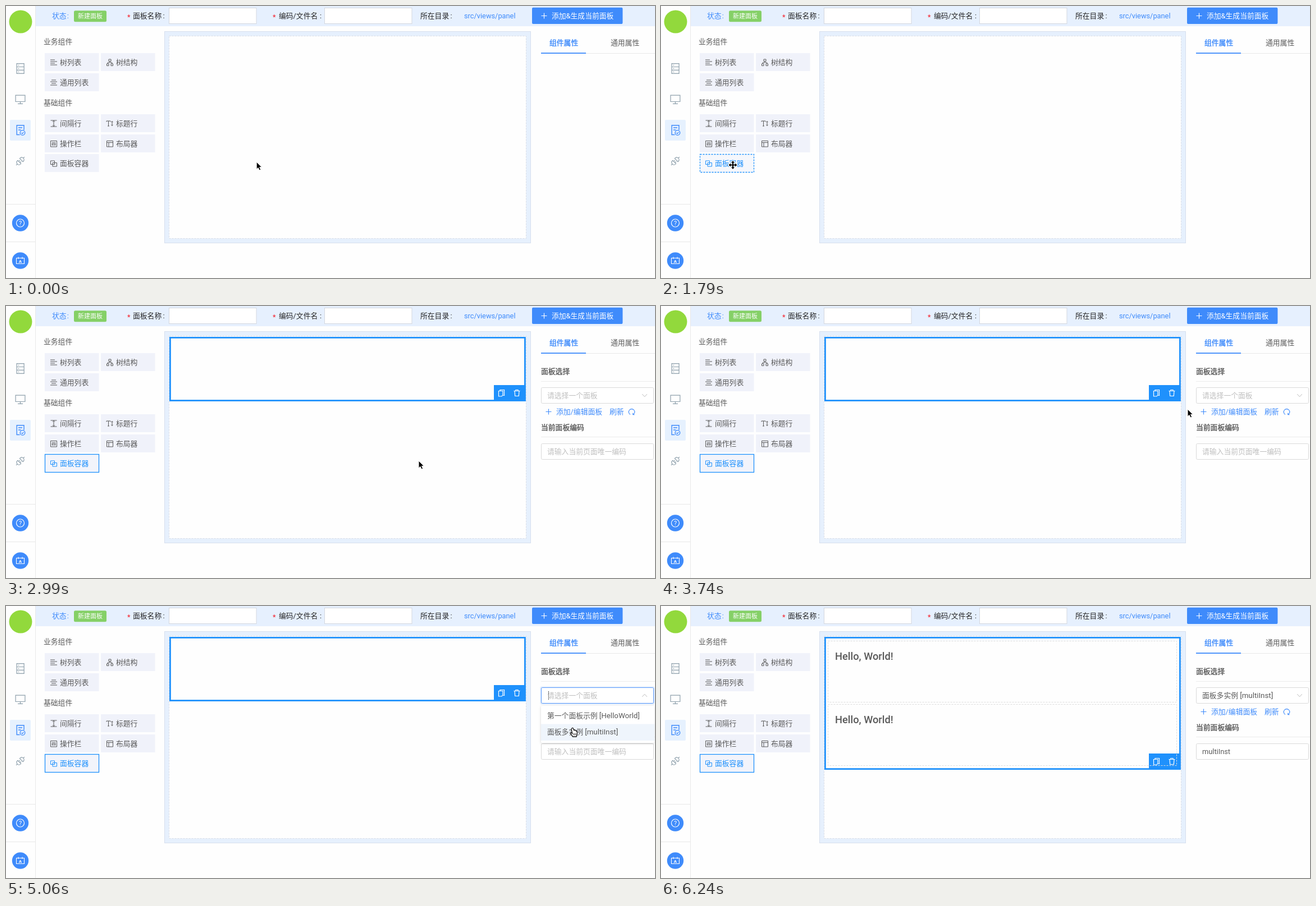
Recreate the animation shown at these times as an HTML page. Size 1156x485 px, loop 7140 ms.

```html
<!DOCTYPE html>
<html lang="zh-CN">
<head>
<meta charset="utf-8">
<title>面板设计</title>
<style>
html, body { margin: 0; width: 100%; height: 100%; overflow: hidden; background: #fefefe; }
svg { display: block; }
text { font-family: Roboto, "Noto Sans CJK SC", "Noto Sans CJK", sans-serif; white-space: pre; }
[data-l], [data-c] { display: none; }
.on { display: inline; }
</style>
</head>
<body>
<svg id="stage" width="1156" height="485" viewBox="0 0 1156 485"></svg>
<script>
const LOOP = 7140;
const BLUE = '#3f8bfb', PICK = '#1f91fc', GREY = '#595959', PALE = '#bfbfbf', BORDER = '#d9d9d9';

const rect = (x, y, w, h, fill, extra = '') =>
  `<rect x="${x}" y="${y}" width="${w}" height="${h}" fill="${fill}" ${extra}/>`;
const frame = (x, y, w, h, fill, stroke, extra = '') =>
  rect(x + .5, y + .5, w - 1, h - 1, fill, `stroke="${stroke}" ${extra}`);
const txt = (x, mid, s, fill = GREY, size = 12.8, extra = '') =>
  `<text x="${x}" y="${mid + size * .33}" font-size="${size}" fill="${fill}" ${extra}>${s}</text>`;
// medium weight, which the CJK font lacks
const strong = (x, mid, s, fill = GREY) => txt(x, mid, s, fill, 12.8, `stroke="${fill}" stroke-width=".4"`);
const option = (mid, name, code) => txt(964, mid, `${name} <tspan font-size="13.3">[${code}]</tspan>`);
const line = (d, stroke, x = 0, y = 0, w = 1, turn = 0) =>
  `<path d="${d}" transform="translate(${x} ${y}) rotate(${turn})" fill="none" stroke="${stroke}" stroke-width="${w}"/>`;
const layer = (name, body) => `<g data-l="${name}">${body}</g>`;
const dash = 'stroke-dasharray="3 2"';

// 12px icons, drawn from their top left corner
const icons = {
  list: 'M0 1.5H8M0 4.5H12M0 7.5H8M0 10.5H12',
  center: 'M2 1.5H10M0 4.5H12M2 7.5H10M0 10.5H12',
  tree: 'M4 .5H8V4H4ZM.5 8.5H4V12H.5ZM8 8.5H11.5V12H8ZM6 4V6.3M2.2 8.5V6.3H9.8V8.5',
  gap: 'M.5 .5H11.5M.5 11.5H11.5M6 1V11M4 3L6 1L8 3M4 9L6 11L8 9',
  title: 'M0 3V1.5H7V3M3.5 1.5V10.5M2 10.5H5M10 2V10M8.5 3.7L10 2L11.5 3.7M8.5 8.3L10 10L11.5 8.3',
  bar: 'M.5 1H11.5V11.5H.5ZM3.5 3V9.5M6 3V9.5M8.5 3V9.5M2.5 7H4.5M5 4.5H7M7.5 7H9.5',
  layout: 'M.5 1H11.5V11.5H.5ZM.5 4H11.5M4 4V11.5',
  panel: 'M.5 1.5H7.5V8H.5ZM4 5H11.5V11.5H4Z'
};

const label = (x, y, icon, s, color) => line(icons[icon], color, x + 10, y + 10.5) + txt(x + 27, y + 16.5, s, color);
const item = (x, y, icon, s) => rect(x, y, 96.5, 32, '#f0f2fa') + label(x, y, icon, s, GREY);
const active = (fill, extra) => frame(69, 264, 97, 33, fill, PICK, `stroke-width="1.3" ${extra}`) +
  label(69, 264, 'panel', '面板容器', PICK);

const sidebar = () => {
  const ink = '#8d9fab';
  return rect(0, 0, 52, 485, '#fefefe') +
    line('M52.5 0V485M0 353.5H52M0 420.5H52', '#e8e8e8') +
    '<circle cx="26" cy="28" r="20.5" fill="#92d93c"/>' +
    line('M.6 .6H13.6V18.4H.6ZM.6 6.5H13.6M.6 12.4H13.6M3 3.5H5M3 9.5H5M3 15.5H5', ink, 18.5, 102, 1.2) +
    line('M.6 .6H17.4V12H.6ZM9 12V15.5M4.5 15.9H13.5', ink, 16.5, 158.5, 1.2) +
    rect(7, 203, 37, 37, '#e6f1fe', 'rx="2"') +
    line('M6 17.5H.7V.7H13.5V9M3.5 5H10.5M3.5 9H8', BLUE, 18.5, 212, 1.4) +
    `<circle cx="29.5" cy="226" r="4.3" fill="#e6f1fe" stroke="${BLUE}" stroke-width="1.3"/>` +
    line('M-2 0L-.4 1.6L2.2-1.2', BLUE, 29.5, 226, 1.2) +
    line('M-4-2.5H4V-4A4 3.5 0 0 0-4-4ZM-4 2.5H4V4A4 3.5 0 0 1-4 4ZM-1.7 2.5V-.5M1.7 2.5V-.5M0-7.5V-10.5M0 7.5V10.5',
      ink, 25.5, 276.5, 1.2, 45) +
    [387, 454].map(y => `<circle cx="25.5" cy="${y}" r="14.7" fill="${BLUE}"/>`).join('') +
    '<circle cx="25.5" cy="387" r="7" fill="none" stroke="#fff" stroke-width="1.2"/>' +
    '<text x="25.5" y="391" font-size="11" text-anchor="middle" fill="#fff">?</text>' +
    line('M.5 2H14.5V12H.5ZM4 0V3.5M11 0V3.5', '#fff', 18, 447.5, 1.1) +
    '<text x="25.5" y="457.8" font-size="8" font-weight="700" text-anchor="middle" fill="#fff">A</text>';
};

const header = () => {
  const ink = '#262626', red = '#f5222d';
  return rect(53, 0, 1103, 36, '#e6f0fe') +
    txt(82, 17.5, '状态', BLUE) + txt(108.8, 17.5, ':', BLUE) +
    rect(121, 8.2, 58, 20, '#85d067', 'rx="2.5"') + txt(128, 18, '新建面板', '#fff', 11) +
    txt(216, 20, '*', red) + txt(226, 17.5, '面板名称', ink) + txt(279.5, 17.5, ':', ink) +
    frame(290, 3, 156.5, 29, '#fff', '#d3d7df') +
    txt(475, 20, '*', red) + txt(486, 17.5, '编码/文件名', ink) + txt(559, 17.5, ':', ink) +
    frame(567, 3, 156.5, 29, '#fff', '#d3d7df') +
    txt(738, 17.5, '所在目录', ink) + txt(791.5, 17.5, ':', ink) + txt(816, 17.4, 'src/views/panel', BLUE) +
    rect(937, 2.7, 161.4, 29.3, BLUE, 'rx="2"') + line('M-5 0H5M0-5V5', '#fff', 958.5, 17.5, 1.1) +
    txt(972, 17.5, '添加&amp;生成当前面板', '#fff');
};

const palette = () =>
  txt(67, 64, '业务组件') + item(69, 84, 'list', '树列表') + item(169, 84, 'tree', '树结构') +
  item(69, 120, 'center', '通用列表') +
  txt(67, 173, '基础组件') + item(69, 193, 'gap', '间隔行') + item(169, 193, 'title', '标题行') +
  item(69, 229, 'bar', '操作栏') + item(169, 229, 'layout', '布局器') +
  layer('plain', item(69, 264, 'panel', '面板容器')) +
  layer('dash', active('#f5f7fc', dash)) + layer('pick', active('#f2f4fb', ''));

const canvas = () => frame(282, 45, 653, 378, '#e6f0fd', '#d6dfee') +
  frame(290, 53, 637, 362, '#fefefe', '#d9dde6', dash);

const chosen = bottom => rect(292.4, 56.4, 632, bottom - 57.8, '#fefefe', `stroke="${PICK}" stroke-width="2.8"`) +
  rect(869, bottom - 29, 56.5, 29, PICK) +
  line('M3 2.5V.5H10.5V10.5H8.5M.5 2.5H8V9.5L6 12H.5Z', '#fff', 877, bottom - 21, 1.2) +
  line('M0 2.5H11M3.5 2.5V.5H7.5V2.5M1.5 2.5L2.2 11.5H8.8L9.5 2.5', '#fff', 904.5, bottom - 21, 1.2);

const hello = y => frame(297, y, 622, 110, 'none', '#dcdcdc', dash) +
  txt(310, y + 28, 'Hello, World!', GREY, 18.3, 'font-weight="500"');

const chevron = (name, turn) => layer(name, line('M-4.3-2.4L0 2.4L4.3-2.4', PALE, 1137.5, 159.5, 1, turn));

const props = () =>
  line('M953 84.5H1156', '#e8e8e8') + rect(953, 83.2, 80, 1.8, BLUE) +
  strong(968, 66, '组件属性', BLUE) + txt(1077, 66, '通用属性') +
  layer('props',
    strong(953, 117, '面板选择') + line('M953 134.5H1156M953 233.5H1156', '#ececec') +
    frame(953, 145, 201, 29, '#fff', BORDER, 'rx="2"') +
    line('M-5 0H5M0-5V5', BLUE, 966.5, 188.5, 1.1) + txt(980, 188.5, '添加/编辑面板', BLUE) +
    txt(1075, 188.5, '刷新', BLUE) + line('M-2.6 5A5.3 5.3 0 1 1 2.6 5M2.2 2.2V5.2H5', BLUE, 1114.5, 188.5, 1.1) +
    strong(953, 217, '当前面板编码') + frame(953, 245, 201, 29, '#fff', BORDER, 'rx="2"')) +
  layer('focus', rect(952, 144, 203, 31, 'none', 'rx="3" stroke="#e6f0fd" stroke-width="2"') +
    frame(953, 145, 201, 29, '#fff', '#5596fa', 'rx="2"') + line('M966.5 152V167', '#444')) +
  layer('hint', txt(964, 159.5, '请选择一个面板', PALE)) +
  layer('code', txt(964, 259.5, '请输入当前页面唯一编码', PALE)) +
  layer('value', option(159.5, '面板多实例', 'multiInst') + txt(964, 259.3, 'multiInst')) +
  chevron('down', 0) + chevron('turn', 138) + chevron('up', 180) +
  layer('menu', rect(953, 178, 202, 66, '#fff', 'rx="2" style="filter:drop-shadow(0 1px 2px rgba(0,0,0,.17))"')) +
  layer('row1', rect(953, 181, 202, 29.5, '#eff5fc')) +
  layer('row2', rect(953, 210.5, 202, 29.5, '#eff5fc')) +
  layer('menu', option(196, '第一个面板示例', 'HelloWorld') + option(225, '面板多实例', 'multiInst'));

const cursors = {
  arrow: '<path d="M0 0V13.2L3 10.4L5.2 15L7.6 13.9L5.5 9.4H9.5Z" fill="#000" stroke="#fff" stroke-width="1"/>',
  move: '<path d="M0-7.5L3-4H1V-1H4V-3L7.5 0L4 3V1H1V4H3L0 7.5L-3 4H-1V1H-4V3L-7.5 0L-4-3V-1H-1V-4H-3Z" fill="#000" stroke="#fff" stroke-width="1.6" paint-order="stroke"/>',
  beam: ['#fff', '#111'].map((c, i) =>
    line('M-3.5-7Q0-7 0-5Q0-7 3.5-7M0-5V5M-3.5 7Q0 7 0 5Q0 7 3.5 7M-1.5 2.5H1.5', c, 0, 0, i ? 1.2 : 2.8)).join(''),
  hand: '<path d="M-3-7Q-1.5-8.5-.5-6.5L.5-3.5Q2-4.5 2.8-3Q4.2-3.6 4.8-2Q6.3-2 6.3 0V4L5 8H-1.5L-5.5 2.5Q-6 .5-4 1L-2.3 2.3L-4-5Q-4-6.5-3-7Z" fill="#fff" stroke="#111" stroke-width="1.3"/>' +
    line('M0 2V5.5M2 2V5.5M4 2V5.5', '#111', 0, 0, .8)
};

const ghost = `<g id="ghost" data-l="ghost" opacity=".55">${active('#f5f7fc', dash)}</g>`;
const pointer = '<g id="pointer">' +
  Object.entries(cursors).map(([k, s]) => `<g data-c="${k}">${s}</g>`).join('') + '</g>';

const stage = document.getElementById('stage');
stage.innerHTML = rect(0, 0, 1156, 485, '#fefefe') + sidebar() + header() + palette() + canvas() +
  layer('box', chosen(170)) + layer('full', chosen(292) + hello(62) + hello(175)) + props() + ghost + pointer;

const scenes = {
  idle: 'plain',
  hover: 'dash',
  drag: 'dash ghost',
  drop: 'pick box props hint code down',
  focus: 'pick box props focus hint code down',
  opening: 'pick box props focus hint code menu row1 turn',
  first: 'pick box props focus hint code menu row1 up',
  second: 'pick box props focus hint code menu row2 up',
  chosen: 'pick box props value down',
  loaded: 'pick full props value down'
};

// start, x, y, cursor, scene
const steps = [
  [0, 446.2, 278, 'arrow', 'idle'],
  [450, 450, 279.5, 'arrow', 'idle'],
  [600, 453, 280, 'arrow', 'idle'],
  [890, 453, 280.5, 'arrow', 'idle'],
  [1340, 405, 286, 'arrow', 'idle'],
  [1490, 255, 293, 'arrow', 'idle'],
  [1640, 138, 287, 'move', 'hover'],
  [1790, 128, 283.5, 'move', 'hover'],
  [2240, 150, 284, 'arrow', 'drag'],
  [2390, 300, 288, 'arrow', 'drag'],
  [2540, 490, 290, 'arrow', 'drag'],
  [2690, 640, 288, 'arrow', 'drag'],
  [2840, 715, 283, 'arrow', 'drop'],
  [2990, 735, 276, 'arrow', 'drop'],
  [3440, 756, 270, 'arrow', 'drop'],
  [3590, 840, 233, 'arrow', 'drop'],
  [3740, 938, 184, 'arrow', 'drop'],
  [3890, 986, 160, 'beam', 'drop'],
  [4030, 995, 156, 'beam', 'focus'],
  [4180, 995, 156, 'beam', 'opening'],
  [4330, 995, 156, 'beam', 'first'],
  [4480, 996, 160, 'beam', 'first'],
  [4630, 999, 178, 'arrow', 'first'],
  [4780, 1005, 200, 'hand', 'first'],
  [4930, 1009, 218, 'hand', 'second'],
  [5060, 1011, 225, 'hand', 'second'],
  [5210, 1011, 225, 'hand', 'chosen'],
  [5360, 1008, 225, 'arrow', 'loaded'],
  [5500, 990, 224, 'beam', 'loaded'],
  [5650, 972, 223, 'beam', 'loaded'],
  [5800, 962, 285, 'arrow', 'loaded'],
  [5940, 944, 375, 'arrow', 'loaded'],
  [6090, 922, 464, 'arrow', 'loaded'],
  [6240, 0, 0, '', 'loaded']
];

const layers = [...stage.querySelectorAll('[data-l]')];
const shapes = [...stage.querySelectorAll('[data-c]')];
const hand = document.getElementById('pointer');
const drag = document.getElementById('ghost');
let last = null;

function draw() {
  const t = performance.now() % LOOP;
  const step = steps.findLast(s => s[0] <= t);
  if (step !== last) {
    const [, x, y, kind, scene] = last = step;
    const shown = scenes[scene].split(' ');
    layers.forEach(el => el.classList.toggle('on', shown.includes(el.dataset.l)));
    shapes.forEach(el => el.classList.toggle('on', el.dataset.c === kind));
    hand.setAttribute('transform', `translate(${x} ${y})`);
    drag.setAttribute('transform', `translate(${x - 128} ${y - 283})`);
  }
  requestAnimationFrame(draw);
}
draw();
</script>
</body>
</html>
```
